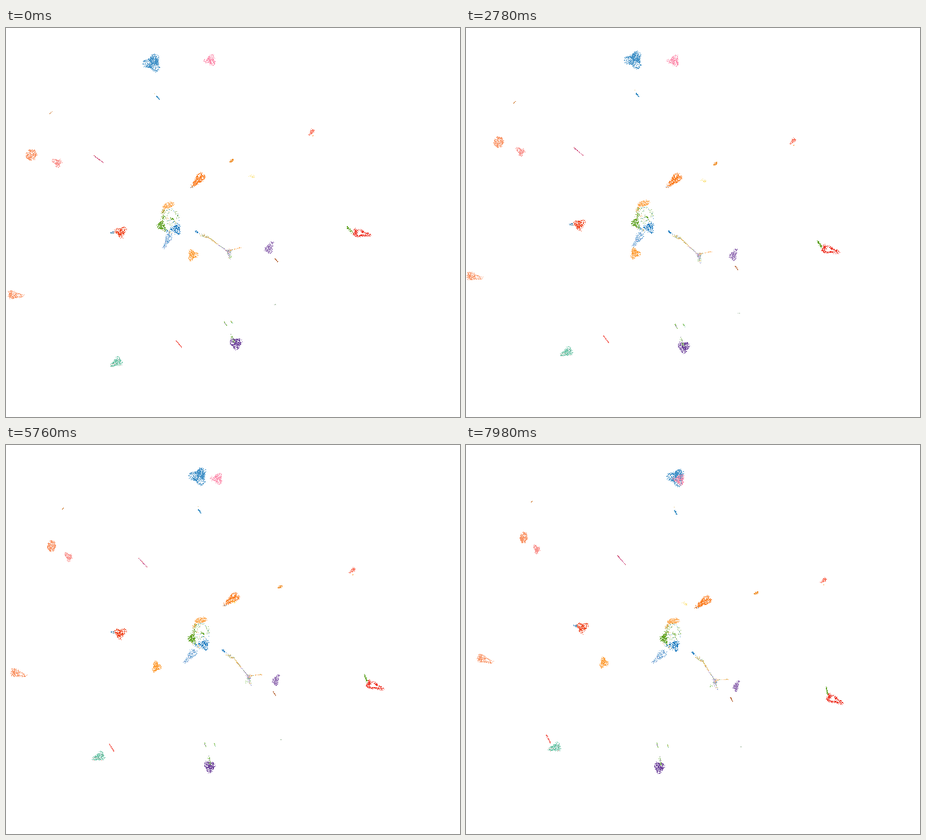
These frames come from a looping animation (762x654 px, 8000 ms). A matplotlib script:

```python
import numpy as np
import matplotlib.pyplot as plt
from matplotlib.animation import FuncAnimation
from matplotlib.colors import to_rgb

W, H, DPI = 762, 654, 100
FRAMES, STEP = 100, 80
SPAN = 7980
ROLL = 0.24              # in-plane turn of every cluster over one loop
AXIS_X = 325             # where the turning axis crosses the stage
ARC, LIFT = 0.028, 0.037  # sagitta of the orbits, across and up

BLUE, SKY, AZURE, GREY = "#1f7cc0", "#86b4dc", "#4593c8", "#9aa3ad"
GREEN, LIME, TEAL = "#62a427", "#8cc665", "#6cc5a8"
ORANGE, AMBER, PEACH, SAND = "#fb8128", "#fd9f3a", "#fdab57", "#e0bb62"
SALMON, CORAL, ROSE, PINK = "#f9976a", "#fa7762", "#f99590", "#fc8fae"
RED, FLAME, BROWN, CREAM = "#ee3a2d", "#f04a25", "#b4602f", "#fbe58a"
PURPLE, VIOLET, LILAC, MAGENTA = "#6f449c", "#9a78b8", "#b09bc8", "#d0568c"

rng = np.random.default_rng(12)
starts, ends, tints = [], [], []


def add(a, b, color, extra=(), mix=0.15):
    starts.append(a)
    ends.append(b)
    stray = rng.random(len(a)) < mix
    for odd in stray:
        name = extra[rng.integers(len(extra))] if odd and extra else color
        tints.append(to_rgb(name))


def turn(p, angle):
    c, s = np.cos(angle), np.sin(angle)
    return p @ np.array([[c, s], [-s, c]])


def put(local, start, end, tilt, squeeze, fuzz, color, **mixing):
    """Pose a local shape at both ends of its path."""
    local = local + rng.normal(0, fuzz, local.shape)
    angle = np.radians(tilt)
    a = turn(local, angle)
    b = turn(local, angle + ROLL) * [squeeze, 1]
    add(a + start, b + end, color, **mixing)


def cloud(color, n, start, end, a, b, tilt=0, tip=0.3, hole=0, squeeze=1,
          fuzz=0.5, **mixing):
    """Three-lobed ellipse whose longest lobe points along tilt."""
    phi = rng.uniform(0, 2 * np.pi, n)
    r = np.sqrt(rng.uniform(hole ** 2, 1, n)) * (1 + tip * np.cos(3 * phi))
    local = np.column_stack([a * r * np.cos(phi), b * r * np.sin(phi)])
    put(local, start, end, tilt, squeeze, fuzz, color, **mixing)


def dash(color, n, start, end, length, tilt=0, squeeze=1, fuzz=0.3, **mixing):
    local = np.column_stack([rng.uniform(-0.5, 0.5, n) * length, np.zeros(n)])
    put(local, start, end, tilt, squeeze, fuzz, color, **mixing)


def link(color, n, p, q, fuzz=0.4, **mixing):
    """Thread of points between two joints, each a (start, end) pair."""
    p, q = np.array(p, float), np.array(q, float)
    u = rng.random((n, 1))
    noise = rng.normal(0, fuzz, (n, 2))
    add(p[0] + u * (q[0] - p[0]) + noise, p[1] + u * (q[1] - p[1]) + noise,
        color, **mixing)


# top
cloud(AZURE, 430, (246, 59), (354, 55), 13, 13, 175)
cloud(AZURE, 190, (249, 55), (358, 51), 7, 8, tip=0)
dash("#3a8fc4", 34, (255.5, 118), (353, 114), 8, 50, fuzz=0.5)
dash(SAND, 1, (250, 110), (351, 105), 1)
cloud(PINK, 230, (343, 54), (358, 58), 8.5, 8, 170)

# upper left
dash("#d8955a", 14, (75.5, 142), (110.5, 95), 6, -42, squeeze=0.4)
cloud(SALMON, 270, (42.5, 213.5), (97.5, 155.5), 9.5, 9.5, tip=0, squeeze=0.65)
cloud(ROSE, 165, (86, 226.5), (119, 175), 8, 6, 215, squeeze=0.7)
dash(MAGENTA, 48, (155.5, 220.5), (262, 193.5), 21, 37, fuzz=0.2,
     extra=("#a65a9a", "#e0605c"), mix=0.3)

# upper right
cloud(CORAL, 75, (513, 175), (601, 228), 6, 2.5, 128)
dash(PEACH, 3, (514, 181), (600, 235), 2, fuzz=0.5)
cloud("#f0912e", 42, (378.5, 223), (488, 249), 4.5, 1.7, -40, tip=0)
cloud(ORANGE, 340, (323, 255), (400, 264), 14, 6, 133)
dash(SKY, 6, (311, 268), (388, 274), 6, -30, fuzz=0.6, extra=(GREY,), mix=0.4)
dash(CREAM, 20, (412.5, 249), (367, 266.5), 8, 20, fuzz=0.8)

# central loop
mixed = dict(extra=(LIME, PEACH, SKY, BLUE), mix=0.5)
cloud(PEACH, 180, (273, 298), (349, 296), 10, 4.5, -22, tip=0)
dash(PEACH, 35, (265, 306), (339, 303), 9, -70, fuzz=1)
cloud(GREEN, 190, (261, 333), (333, 326), 8, 6.5, 50, squeeze=0.9)
dash(GREEN, 48, (263.5, 317), (336.5, 314), 22, -83, fuzz=1.7, extra=(LIME, PEACH))
cloud(GREEN, 60, (279, 317), (350, 314), 15, 12, -90, tip=0, hole=0.5, fuzz=1, **mixed)
dash(GREEN, 18, (279, 321), (350, 318), 6, 20, fuzz=0.7)
dash(SKY, 40, (272, 342), (339, 338), 16, 25, fuzz=1.5, **mixed)
cloud(BLUE, 170, (286, 338), (351, 337), 8, 7.5, 60, fuzz=0.9)
cloud(SKY, 200, (271, 357), (326, 355), 13, 4.5, 115, squeeze=1.3, extra=(LILAC, AZURE))

# branching thread
head, neck = ((318, 341), (380, 348)), ((324, 346), (385, 354))
knee, shin = ((341, 353), (398, 364)), ((355, 363), (407, 379))
hub = ((372, 376), (418, 396))
foot, hand = ((376, 388), (422, 411)), ((396, 368), (442, 394))
speckled = dict(extra=(GREY, LIME, SKY, PEACH), mix=0.4)
link(BLUE, 24, head, neck, 0.6)
cloud(SAND, 55, (333, 350), (392, 360), 8, 2, 17, tip=0, **speckled)
link(SAND, 45, knee, shin, **speckled)
link(LILAC, 36, shin, hub, **speckled)
cloud(LILAC, 60, (374, 377), (418, 398), 5.5, 3.5, 75, **speckled)
link(LILAC, 24, hub, foot, 0.7, **speckled)
link(PEACH, 30, hub, hand, extra=(LILAC, LIME))
cloud(LIME, 6, (376, 385), (411, 405), 2, 2, tip=0)

# left and lower centre
cloud(FLAME, 210, (193, 343), (195.5, 306.5), 8.5, 9, 80)
cloud("#3f88b8", 22, (179, 344), (184, 304), 4, 2, tip=0, extra=(TEAL, LILAC), mix=0.4)
cloud(AMBER, 230, (313, 382), (230.5, 366), 8.5, 7, 120, squeeze=0.8)
cloud(VIOLET, 200, (442, 370), (453.5, 406), 9.5, 6.5, -60, squeeze=0.6)
dash(BROWN, 26, (453.5, 390), (445.5, 427.5), 8, 50)
dash("#a9bfa8", 4, (451.5, 465), (461.5, 508), 3, fuzz=0.1)

# far sides
cloud(RED, 260, (595, 345), (617, 428), 14, 6, 13, hole=0.5)
dash(GREEN, 55, (577, 339), (606, 414), 12, 45, squeeze=0.4, fuzz=1)
cloud(SALMON, 140, (15, 449), (31, 360), 13, 6, 5, hole=0.5)
cloud(SALMON, 85, (11, 450), (26, 359), 6.5, 4.5, tip=0)

# bottom
sprout = dict(extra=(PURPLE, GREEN, LILAC), mix=0.4)
dash(LIME, 20, (368.5, 497.5), (321, 505), 10, 61, **sprout)
dash(LIME, 12, (378.5, 494.5), (338.5, 506), 6, 58, extra=(PEACH, TEAL), mix=0.6)
cloud(PURPLE, 290, (386, 530), (324, 542), 9, 9.5, 85, tip=0.2, squeeze=0.85)
dash(LIME, 36, (381, 523), (326, 532), 14, 62, fuzz=1, **sprout)
dash("#f46a62", 60, (290.5, 531.5), (137.5, 494), 17, 50)
cloud(TEAL, 220, (186, 562), (150, 508), 10, 6.5, 150, extra=(GREY, ROSE), mix=0.1)

A, B = np.vstack(starts), np.vstack(ends)
BOW = np.column_stack([ARC * ((A + B)[:, 0] / 2 - AXIS_X),
                       -LIFT * (B - A)[:, 0]])


def place(i):
    s = i * STEP / SPAN
    p = A + (B - A) * s + BOW * 4 * s * (1 - s)
    return np.floor(p) + 0.5


fig = plt.figure(figsize=(W / DPI, H / DPI), dpi=DPI, facecolor="white")
ax = fig.add_axes([0, 0, 1, 1])
ax.set_xlim(0, W)
ax.set_ylim(H, 0)
ax.axis("off")
dots = ax.scatter(*place(0).T, s=(72 / DPI) ** 2, c=tints, marker="s", linewidths=0)


def draw(i):
    dots.set_offsets(place(i))
    return (dots,)


anim = FuncAnimation(fig, draw, frames=FRAMES, interval=STEP, repeat=True,
                     repeat_delay=0, blit=False)
plt.show()
```
